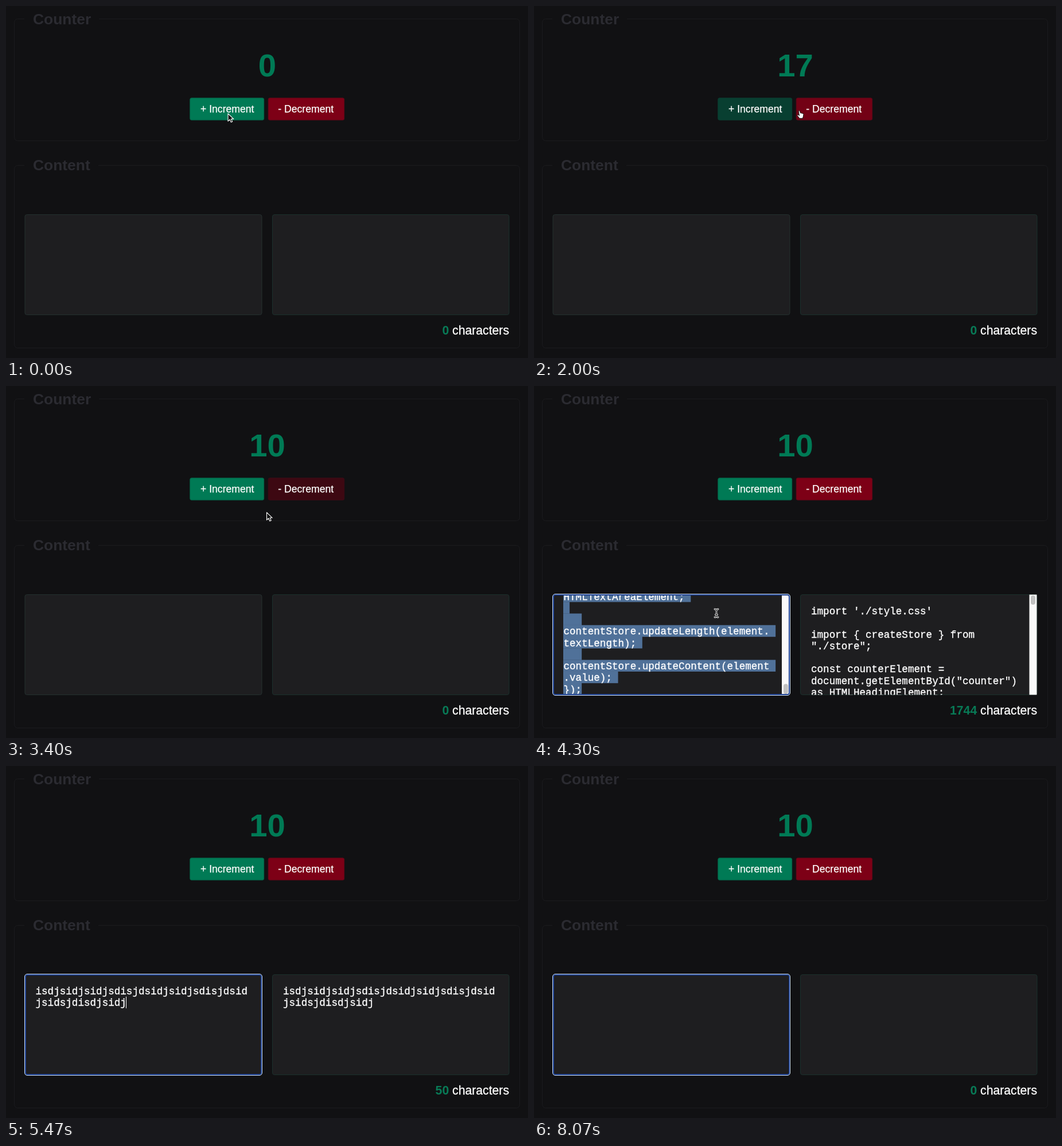
Recreate the animation shown at these times as an HTML page. Size 910 px wide and 615 px high, loop 8.26 s.

```html
<!DOCTYPE html>
<html lang="en">
<head>
<meta charset="utf-8">
<title>Counter and content</title>
<style>
  html, body { margin: 0; width: 100%; height: 100%; overflow: hidden; background: #111113; }
  svg { display: block; width: 910px; height: 615px; font-family: "Liberation Sans", Arial, sans-serif; }
  text { white-space: pre; }
  .frame { fill: none; stroke: #1b1b1e; }
  .legend { font-weight: 700; font-size: 26.4px; fill: #2b2b31; }
  .count { font-weight: 700; font-size: 56.3px; fill: #007a55; text-anchor: middle; }
  .label { font-size: 17.6px; fill: #fff; stroke: #fff; stroke-width: .25px; text-anchor: middle; }
  .total { font-size: 21.2px; fill: #fff; stroke: #fff; stroke-width: .3px; text-anchor: end; }
  .total tspan { font-weight: 700; fill: #087a56; stroke: none; }
  .box { fill: #1e1e20; }
  .code { font: 17.6px "Liberation Mono", "Courier New", monospace; fill: #fff; stroke: #fff; stroke-width: .35px; }
  .sel { fill: #507199; }
  .bar { fill: #fafafa; }
  .thumb { fill: #c1c1c1; }
  .cursor { stroke-linejoin: round; stroke-linecap: round; }
</style>
</head>
<body>
<svg viewBox="0 0 910 615">
  <defs>
    <clipPath id="clipL"><rect x="35" y="366" width="409" height="173"/></clipPath>
    <clipPath id="clipR"><rect x="465" y="365" width="411" height="174.5"/></clipPath>
    <path id="ibeam" d="M-3-7Q0-7 0-5Q0-7 3-7M0-5V5M-3 7Q0 7 0 5Q0 7 3 7M-1.500 2.500H1.500"/>
  </defs>

  <path class="frame" d="M32 22.500H20.500a6 6 0 0 0-6 6V229.500a6 6 0 0 0 6 6H889.500a6 6 0 0 0 6-6V28.500a6 6 0 0 0-6-6H162"/>
  <path class="frame" d="M32 278.500H20.500a6 6 0 0 0-6 6V591.500a6 6 0 0 0 6 6H889.500a6 6 0 0 0 6-6V284.500a6 6 0 0 0-6-6H161"/>
  <text class="legend" x="47" y="31.500">Counter</text>
  <text class="legend" x="47" y="287">Content</text>

  <text class="count" id="count" x="455.500" y="123">0</text>
  <rect id="inc" x="320.800" y="160.800" width="128.900" height="38.400" rx="2.500"/>
  <rect id="dec" x="457.200" y="160.800" width="132.500" height="38.400" rx="2.500"/>
  <text class="label" x="385.700" y="186">+ Increment</text>
  <text class="label" x="522.700" y="186">- Decrement</text>

  <rect class="box" x="33" y="364.500" width="413" height="175" rx="3.500" stroke="#24302f"/>
  <rect class="box" x="464.500" y="364.500" width="412.500" height="175" rx="3.500" stroke="#1b302c"/>

  <g clip-path="url(#clipL)">
    <g id="sel"></g>
    <g id="left" class="code"></g>
    <rect id="caret" width="1" height="20.500" fill="#fff"/>
  </g>
  <g id="right" class="code" clip-path="url(#clipR)"></g>
  <g id="bars">
    <rect class="bar" x="432" y="365.500" width="12.500" height="173.500"/>
    <rect class="thumb" x="435" y="520.500" width="8" height="17.500" rx="4"/>
    <rect class="bar" x="863.500" y="364.500" width="13" height="175"/>
    <rect class="thumb" x="866" y="366" width="8" height="16" rx="4"/>
  </g>
  <g id="ring" fill="none">
    <rect x="34" y="365" width="411" height="174" rx="3" stroke="#1d3f8f" stroke-width="2"/>
    <rect x="32.500" y="363.500" width="414" height="177" rx="4.500" stroke="#cfe2f5"/>
  </g>
  <text class="total" x="877" y="573.500"><tspan id="total">0</tspan> characters</text>

  <g id="cursor" class="cursor">
    <path id="arrow" d="M-2 1V14.300L1.100 11.300L3.300 16.100L5.700 15L3.600 10.400H7.700Z" fill="#111" stroke="#fff" stroke-width="1.100"/>
    <path id="hand" d="M-1.700 1.200Q-.6-.5 .6 1.200L1.400 4.600Q2.700 3.800 3.300 5Q4.700 4.300 5.300 5.600Q6.900 5.300 7 7L6.300 10.800L5.400 13.800H-.2L-4 8.800Q-4.300 7.200-2.500 7.500L-.8 8.800Z" fill="#fff" stroke="#111" stroke-width="1"/>
    <g id="beam" fill="none">
      <use href="#ibeam" stroke="#eee" stroke-width="2.800"/>
      <use href="#ibeam" stroke="#111" stroke-width="1"/>
    </g>
  </g>
</svg>

<script>
const LOOP = 8260, CHAR = 10.562, ROW = 20.25, TOP = 382.6, SCROLLED = 357;
const LEFT = 51.5, RIGHT = 483;

// Moments of the recorded session, in ms
const AT = {
  incIn: 40, incOut: 1960, decIn: 1982, decOut: 3365, beam: 3600,
  focus: 3700, paste: 3860, selectAll: 4120, type: 4750, typed: 5920,
  reselect: 6150, erase: 6570
};
const PATH = [[0, 389, 187], [1730, 389, 187], [2130, 487, 181], [3290, 487, 181], [3700, 318, 397], [LOOP, 318, 397]];

const TYPED = "isdjsidjsidjsdisjdsidjsidjsdisjdsid" +
  "jsidsjdisdjsidjsidjsdisjdisdjsijdsi" + "sjdisjdsdji";
const HEAD = ["import './style.css'", "", "import { createStore } from", "\"./store\";", "",
  "const counterElement =", "document.getElementById(\"counter\")", "as HTMLHeadingElement;"];
const TAIL = ["HTMLTextAreaElement;", "", "  ", "contentStore.updateLength(element.", "textLength);",
  "  ", "contentStore.updateContent(element", ".value);", "});"];

const GREEN = [0, 122, 85], RED = [125, 0, 22];

const $ = id => document.getElementById(id);
const clamp = (v, lo, hi) => Math.min(hi, Math.max(lo, v));
const within = (t, a, b) => t >= a && t < b;
const show = (id, on) => $(id).setAttribute("visibility", on ? "visible" : "hidden");

function put(el, attrs) {
  for (const k in attrs) el.setAttribute(k, attrs[k]);
  return el;
}

function add(parent, tag, attrs) {
  const el = document.createElementNS("http://www.w3.org/2000/svg", tag);
  return parent.appendChild(put(el, attrs));
}

function drawLines(id, lines, x, top) {
  const g = $(id);
  g.replaceChildren();
  lines.forEach((s, i) => {
    add(g, "text", { x, y: top + i * ROW + 16.5 }).textContent = s;
  });
}

function drawSelection(lines, top) {
  const g = $("sel");
  g.replaceChildren();
  lines.forEach((s, i) => {
    const cols = s.length + (i < lines.length - 1 ? 1 : 0);
    add(g, "rect", { class: "sel", x: LEFT - .5, y: top + i * ROW, width: cols * CHAR + .5, height: ROW + .2 });
  });
}

function mix(a, b, p) {
  return `rgb(${a.map((v, i) => Math.round(v + (b[i] - v) * p))})`;
}

function hover(t, enter, leave) {
  return clamp((t - enter) / 160, 0, 1) - clamp((t - leave) / 160, 0, 1);
}

function position(t) {
  const i = PATH.findIndex((p, k) => k && t <= p[0]);
  const [t0, x0, y0] = PATH[i - 1], [t1, x1, y1] = PATH[i];
  const u = (t - t0) / (t1 - t0), e = u * u * (3 - 2 * u);
  return [x0 + (x1 - x0) * e, y0 + (y1 - y0) * e];
}

function clicks(t, first, gap, most) {
  return clamp(Math.floor((t - first) / gap) + 1, 0, most);
}

let shown = "";
function drawContent(t) {
  const pasted = within(t, AT.paste, AT.type);
  const selected = within(t, AT.selectAll, AT.type) || within(t, AT.reselect, AT.erase);
  let n = 0;
  if (within(t, AT.type, AT.erase))
    n = clamp(Math.floor((t - AT.type) / (AT.typed - AT.type) * TYPED.length) + 1, 1, TYPED.length);
  const key = [pasted, selected, n].join();
  const typed = TYPED.slice(0, n).match(/.{1,35}/g) || [""];
  const lines = pasted ? TAIL : typed;
  const top = pasted ? SCROLLED : TOP;
  if (key !== shown) {
    shown = key;
    drawLines("left", lines, LEFT, top);
    drawLines("right", pasted ? HEAD : typed, RIGHT, TOP);
    drawSelection(selected ? lines : [], top);
    show("bars", pasted);
    $("total").textContent = pasted ? 1744 : n;
  }
  const blinkOff = within(t, 7100, 7570) || t >= 8070;
  show("caret", t >= AT.focus && !selected && !blinkOff);
  const last = lines.length - 1;
  put($("caret"), { x: Math.round(LEFT - .5 + lines[last].length * CHAR), y: top + last * ROW });
}

function drawCounter(t) {
  $("count").textContent = clicks(t, 140, 95, 17) - clicks(t, 2600, 105, 7);
  const inc = hover(t, AT.incIn, AT.incOut), dec = hover(t, AT.decIn, AT.decOut);
  put($("inc"), { fill: mix(GREEN, [11, 43, 36], inc), stroke: mix([4, 98, 70], [14, 48, 40], inc) });
  put($("dec"), { fill: mix(RED, [42, 10, 17], dec), stroke: mix([94, 8, 24], [50, 12, 21], dec) });
}

function drawCursor(t) {
  const [x, y] = position(t);
  put($("cursor"), { transform: `translate(${x.toFixed(1)} ${y.toFixed(1)})` });
  const hand = within(t, AT.incIn, AT.incOut) || within(t, AT.decIn, AT.decOut);
  const beam = t >= AT.beam;
  show("hand", hand);
  show("beam", beam && t < AT.type);
  show("arrow", !hand && !beam);
}

function render(t) {
  drawCounter(t);
  drawContent(t);
  drawCursor(t);
  show("ring", t >= AT.focus);
}

const start = performance.now();
function tick() {
  render((performance.now() - start) % LOOP);
  requestAnimationFrame(tick);
}
render(0);
requestAnimationFrame(tick);
</script>
</body>
</html>
```
